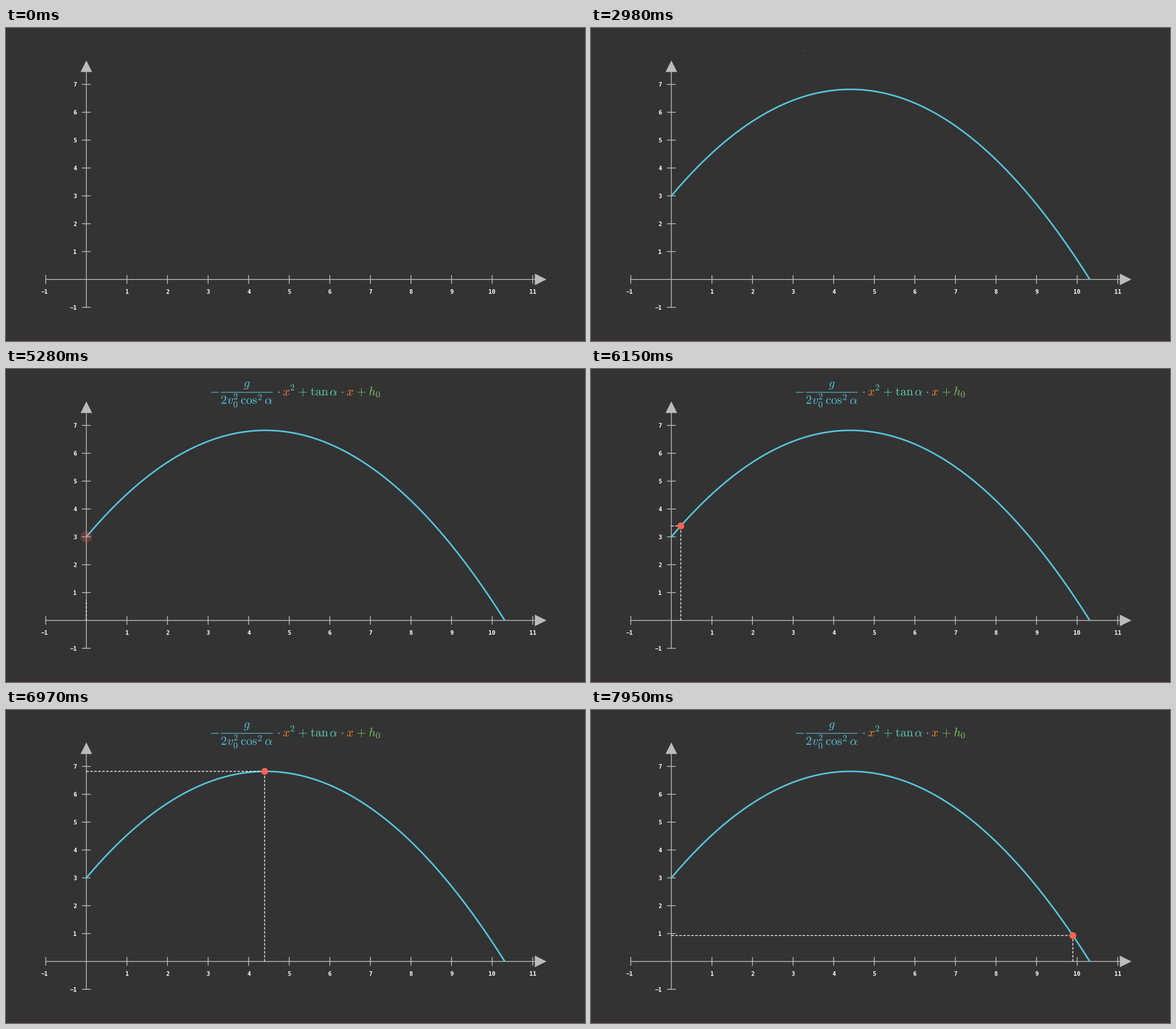
A matplotlib script that plays this animation: 1019 px wide and 550 px high, repeating every 8 s.

```python
import matplotlib.pyplot as plt
import numpy as np
from matplotlib.animation import FuncAnimation
from matplotlib.patches import Circle, PathPatch, Polygon, Rectangle
from matplotlib.path import Path
from matplotlib.textpath import TextPath

W, H, DPI = 1019, 550, 64
STEP, FRAMES = 40, 200
PT = 72 / DPI  # points per pixel

BG, AXIS, WHITE = "#333333", "#bbbbbb", "#ffffff"
BLUE, TEAL, GREEN = "#58c4dd", "#5cd0b3", "#83c167"
ORANGE, RED = "#ff862f", "#fc6255"

X0, Y0, UX, UY = 141.4, 441.8, 71.42, 48.95
THIN, THICK = 1.44 * PT, 2.8 * PT
EM, SMALL = 21.6, 15.8

plt.rcParams.update({
    "font.family": "DejaVu Sans Mono",
    "mathtext.fontset": "cm",
    "path.snap": False,
    "lines.scale_dashes": False,
    "lines.solid_capstyle": "butt",
    "lines.dash_capstyle": "butt",
})

fig = plt.figure(figsize=(W / DPI, H / DPI), dpi=DPI, facecolor=BG)
ax = fig.add_axes([0, 0, 1, 1])
ax.set_xlim(0, W)
ax.set_ylim(H, 0)
ax.axis("off")


def px(x):
    return X0 + UX * x


def py(y):
    return Y0 - UY * y


# Trajectory: launch at 60 degrees, 10 m/s, from a height of 3
TAN, DROP, H0 = np.sqrt(3), 9.81 / 50, 3
X_END = (TAN + np.sqrt(TAN**2 + 4 * DROP * H0)) / (2 * DROP)


def height(x):
    return H0 + TAN * x - DROP * x**2


def smooth(t, start, length):
    u = np.clip((t - start) / length, 0, 1)
    return u**3 * (10 - 15 * u + 6 * u**2)


def segment(x, y):
    ax.plot(x, y, color=AXIS, lw=THIN, zorder=1)


def label(x, y, value):
    ax.text(x, y, str(value).replace("-", "\u2212"), color=WHITE, ha="center",
            va="baseline", fontsize=10.3 * PT, weight="bold", zorder=2)


def draw_axes():
    ax.add_patch(Rectangle((0, 546.3), W, 4, color="#372f33", lw=0))
    segment([px(-1) - 0.7, 931], [Y0, Y0])
    segment([X0, X0], [77, py(-1) + 0.7])
    tips = ([(X0, 57), (X0 - 10.2, 77.3), (X0 + 10.2, 77.3)],
            [(951.2, Y0), (930.7, Y0 - 10.2), (930.7, Y0 + 10.2)])
    for tip in tips:
        ax.add_patch(Polygon(tip, color=AXIS, lw=0, zorder=2))
    for i in range(-1, 12):
        if i:
            segment([px(i)] * 2, [Y0 - 7.7, Y0 + 7.7])
            label(px(i) - (2.6 if i < 0 else 0), 467.4, i)
    for i in range(-1, 8):
        if i:
            segment([X0 - 7.7, X0 + 7.7], [py(i)] * 2)
            label(118.3 if i < 0 else 121.2, py(i) + 4.1, i)


class Stroke:
    """A filled shape that is outlined first and then filled in."""

    def __init__(self, polys, color):
        shape = Path.make_compound_path(*[Path(p, closed=True) for p in polys])
        self.fill = ax.add_patch(PathPatch(shape, fc=color, ec="none", zorder=3))
        self.line, = ax.plot([], [], color=color, lw=THIN, zorder=3)
        gap = [[np.nan, np.nan]]
        self.points = np.vstack([np.vstack([resample(p), gap]) for p in polys])

    def show(self, p):
        edge, body = min(2 * p, 1), max(2 * p - 1, 0)
        n = int(edge * len(self.points))
        self.line.set_data(*self.points[:n].T)
        self.line.set_linewidth(THIN * (1 - body))
        self.line.set_visible(0 < p < 1)
        self.fill.set_alpha(body)
        self.fill.set_visible(body > 0)


def resample(poly, gap=0.3):
    dist = np.r_[0, np.hypot(*np.diff(poly, axis=0).T).cumsum()]
    at = np.linspace(0, dist[-1], max(int(dist[-1] / gap), 2))
    return np.column_stack([np.interp(at, dist, poly[:, k]) for k in (0, 1)])


def glyph(tex, left, base, color, size=EM):
    """Place a symbol by the left edge of its ink and its baseline."""
    fine = 10
    polys = TextPath((0, 0), f"${tex}$", size=size * fine).to_polygons()
    polys = [np.asarray(p) / fine for p in polys]
    edge = min(p[:, 0].min() for p in polys)
    return Stroke([np.column_stack([p[:, 0] - edge + left, base - p[:, 1]])
                   for p in polys], color)


def rule(left, right, y, color, thick=1.1):
    a, b = y - thick / 2, y + thick / 2
    box = [(right, a), (left, a), (left, b), (right, b), (right, a)]
    return Stroke([np.array(box, float)], color)


def word(letters, color, base):
    return [glyph(rf"\mathrm{{{c}}}", x, base, color) for c, x in letters]


def formula():
    return [
        rule(361, 374.2, 41, BLUE),
        glyph("g", 418.8, 31.6, BLUE),
        rule(378, 469.3, 41, BLUE),
        glyph("2", 379, 61.2, BLUE),
        glyph("v", 390, 61.2, BLUE),
        glyph("2", 401, 53.4, BLUE, SMALL),
        glyph("0", 400.6, 67.4, BLUE, SMALL),
        *word([("c", 413.7), ("o", 423.2), ("s", 434.1)], BLUE, 61.2),
        glyph("2", 443.5, 54.6, BLUE, SMALL),
        glyph(r"\alpha", 456.3, 61.2, BLUE),
        glyph(r"\cdot", 479.2, 46.4, BLUE),
        glyph("x", 488, 46.4, ORANGE),
        glyph("2", 500.8, 37.6, TEAL, SMALL),
        glyph("+", 515.5, 46.4, TEAL),
        *word([("t", 536.4), ("a", 545.3), ("n", 555.8)], TEAL, 46.4),
        glyph(r"\alpha", 570.6, 46.4, TEAL),
        glyph(r"\cdot", 591, 46.4, TEAL),
        glyph("x", 600, 46.4, ORANGE),
        glyph("+", 618.3, 46.4, GREEN),
        glyph("h", 639.4, 46.4, GREEN),
        glyph("0", 651.2, 49.8, GREEN, SMALL),
    ]


draw_axes()
symbols = formula()
curve, = ax.plot([], [], color=BLUE, lw=THICK, zorder=4)
dashes = (0, (4.3 * PT, 2.7 * PT))
guide_x, guide_y = (ax.plot([], [], color=WHITE, lw=1.35 * PT, ls=dashes,
                            zorder=5)[0] for _ in range(2))
dot = ax.add_patch(Circle((X0, py(H0)), 6, fc=RED, ec="none", zorder=6))


def draw_curve(t):
    if t > 1220:  # short hold halfway
        t = max(1220, t - 40)
    x = np.linspace(0, X_END * smooth(t, 350, 1740), 200)
    curve.set_data(px(x), py(height(x)))
    curve.set_visible(x[-1] > 0)


def write_formula(t, start=2970, length=1890):
    lag = 4 / (len(symbols) + 1)
    unit = length / (1 + lag * (len(symbols) - 1))
    for i, s in enumerate(symbols):
        s.show(float(np.clip((t - start) / unit - lag * i, 0, 1)))


def move_point(t):
    shown = smooth(t, 5040, 728)
    x = X_END * smooth(t, 5768, 2632)
    cx, cy = px(x), py(height(x))
    dot.center = cx, cy
    dot.set_radius(11.5 - 5.5 * shown)
    dot.set_alpha(shown)
    guide_x.set_data([cx, cx], [Y0, Y0 + (cy - Y0) * shown])
    guide_y.set_data([X0, cx], [cy, cy])
    for part in (dot, guide_x):
        part.set_visible(shown > 0)
    guide_y.set_visible(x > 0)


def update(frame):
    t = frame * STEP + STEP / 2
    draw_curve(t)
    write_formula(t)
    move_point(t)
    return []


anim = FuncAnimation(fig, update, frames=FRAMES, interval=STEP, repeat=True,
                     repeat_delay=0, cache_frame_data=False)
plt.show()
```
